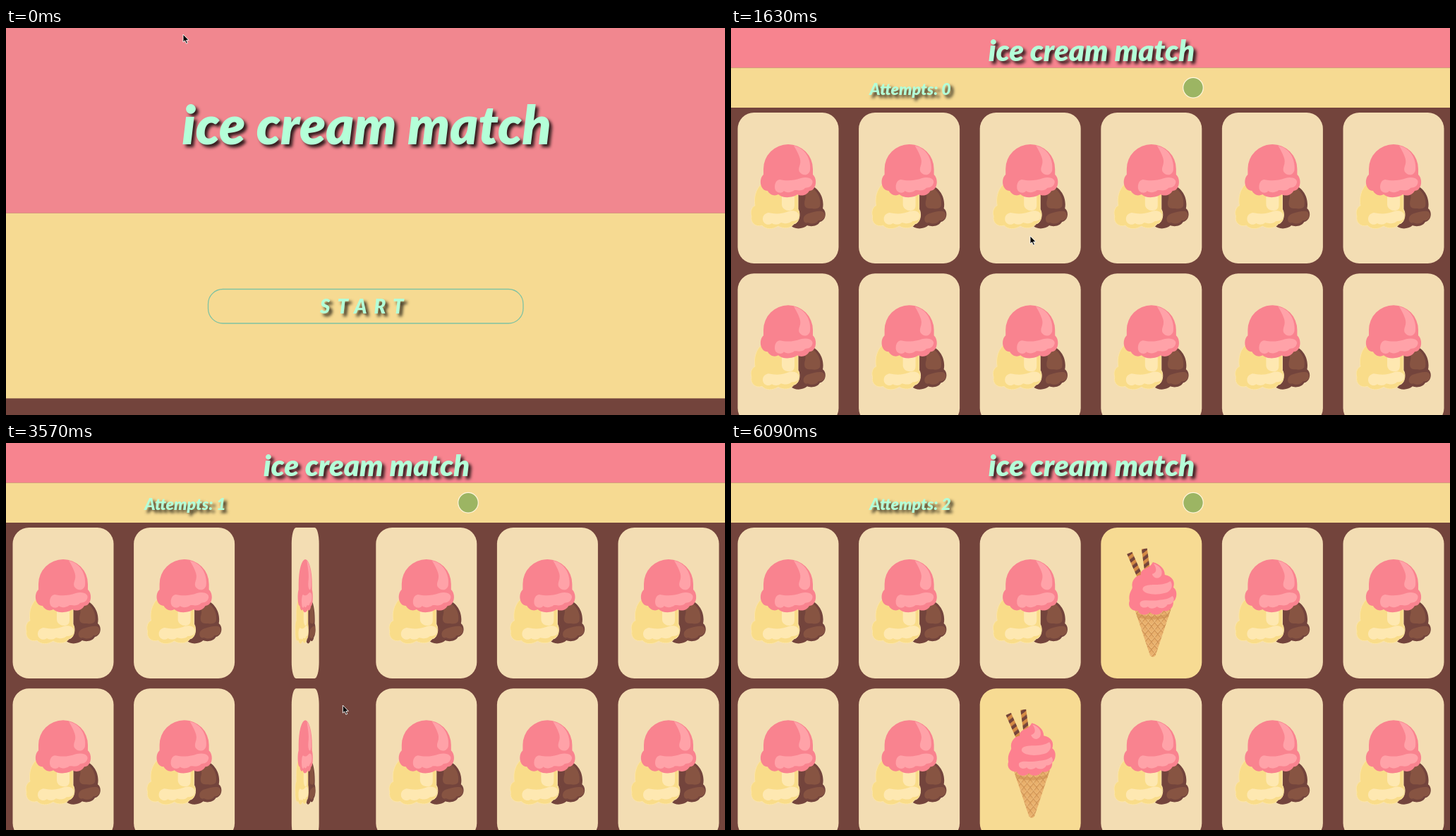
These frames come from a looping animation (1019x549 px, 6.67 s). An HTML page:

```html
<!DOCTYPE html>
<html lang="en">
<head>
<meta charset="utf-8">
<title>ice cream match</title>
<style>
  html, body { margin: 0; width: 100%; height: 100%; overflow: hidden; background: #73443c; }
  svg { display: block; width: 100%; height: 100%; }
  text { font: italic 900 75px Lato, sans-serif; fill: #b4ffd8; filter: drop-shadow(4px 4px 2px #000c); }
  #title, #attempts { text-anchor: middle; }
  #start text { font-size: 27.5px; letter-spacing: 10px; }
</style>
</head>
<body>
<svg id="stage" viewBox="0 0 1019 549">
  <defs>
    <pattern id="waffle" width="9" height="11" patternUnits="userSpaceOnUse">
      <path fill="#e9b06c" d="M0 0H9V11H0Z"/>
      <path fill="none" stroke="#cf9253" stroke-width="1.3" d="M0 0L9 11M9 0L0 11"/>
      <path fill="none" stroke="#f5cb8c" stroke-width=".7" d="M1.3 0L9 9.4M7.7 0L0 9.4"/>
    </pattern>
    <pattern id="stripes" width="9" height="9" patternUnits="userSpaceOnUse" patternTransform="rotate(-38)">
      <path fill="#74443a" d="M0 0H9V9H0Z"/>
      <path fill="#d48b45" d="M0 0H9V4.5H0Z"/>
    </pattern>

    <g id="scoops">
      <path fill="#73443c" d="M0-5H28C43-2 52 14 49 29C55 33 54 46 45 48C41 55 31 55 27 53C20 59 8 59 2 52Z"/>
      <path fill="#875442" d="M22-1H32C43 5 47 16 45 26C42 31 34 29 30 29C23 29 22 23 24 16C26 9 22 6 22-1Z
        M29 36C36 34 42 32 48 33C55 36 52 47 43 46C39 52 31 51 28 49C21 52 18 39 29 36Z"/>
      <path fill="#f9dc89" stroke="#fde6a8" d="M-47 25C-50 8-41-8-30-9H14V30C18 36 16 50 8 51C4 58-8 58-14 54C-22 59-32 59-37 53C-46 56-54 49-52 40C-54 34-52 27-47 25Z"/>
      <path fill="#fee8b1" d="M-9 12C-4 8 6 8 9 11V24C9 31 5 32 1 32C-5 32-9 28-9 23Z
        M-28 35C-19 37-10 37-2 34C6 30 16 33 15 40C15 46 10 47 5 47C0 52-7 50-10 49C-15 53-20 52-23 50C-28 54-36 51-36 44C-36 39-33 36-28 35Z"/>
      <path fill="#f9838f" d="M-35-19V-27A35 35 0 0 1 35-27V-19C42-13 40 4 30 4C26 11 18 12 13 9C7 14-8 15-14 9C-19 12-26 10-29 4C-40 4-42-13-35-19Z"/>
      <path fill="#ffa2a8" d="M8-60C24-57 33-41 31-25C29-17 20-17 16-23C13-30 20-33 16-44C14-50 11-55 8-60Z
        M-12-12C-3-10 7-10 18-14C29-17 37-12 34-6C32 0 26-1 24 0C20 5 13 3 9 3C4 7-3 7-6 4C-9 9-19 7-19-1C-19-7-17-11-12-12Z"/>
    </g>

    <g id="sundae">
      <path fill="url(#waffle)" d="M-31 13H32L28 35C25 38 22 37 22 39L18 63C16 67-16 67-18 63L-22 39C-23 37-26 38-28 35Z"/>
      <path fill="#c98b4e" opacity=".45" d="M-24 36Q0 43 25 36L23 42Q0 47-22 41Z"/>
      <path fill="#fae09a" d="M-31-16C-36 2-35 16-28 18C-24 24-16 24-13 21C-8 27 0 26 3 22C8 26 16 25 18 20C25 23 34 19 32 9C35 0 33-11 30-16Z"/>
      <path fill="#feebbb" d="M-6-9H29Q34 0 30 6C26 11 20 6 16 10C9 16 0 8-6 13C-13 17-23 16-23 10C-23 4-13 5-8 2Z"/>
      <path fill="#73443c" d="M-18-31C-20-44-9-45-5-48H7C10-43 19-43 18-31C25-30 30-27 31-22C36-17 30-10 27-17C24-21 24-8 20-12C18-16 17-9 17 3C17 10 10 10 10 3C10-8 9-19 3-17C-2-15-5-18-6-10V4C-6 11-13 11-13 4V-9C-13-15-18-17-20-10C-22-3-27-4-26-10C-26-19-28-13-32-14C-36-18-28-20-30-23C-28-29-24-30-18-31Z"/>
      <path fill="none" stroke="#73443c" stroke-width="1.4" d="M0-59Q0-63 4-66"/>
      <circle cy="-50" r="10" fill="#e65a4d"/>
      <path fill="#f08272" d="M2-57Q8-54 7-48Q4-50 2-57Z"/>
    </g>

    <g id="cone">
      <path fill="none" stroke="url(#stripes)" stroke-width="8" d="M-31-71L-16-37M-10-77L-6-48"/>
      <path fill="url(#waffle)" d="M-24 8H28L6 74Q2 79-2 74Z"/>
      <path fill="#c98b4e" opacity=".5" d="M-22 14Q2 24 26 14L24 20Q2 27-20 20Z"/>
      <path fill="#fd808f" d="M2-58C13-55 19-48 19-40C30-38 34-30 31-22C38-18 36-5 31-2C32 8 23 13 17 11C11 18 2 18-2 13C-8 19-17 17-19 11C-28 12-34 5-31-3C-33-14-27-19-27-22C-29-32-22-39-15-40C-16-50-2-48 2-58Z"/>
      <path fill="#ffa3a9" d="M3-56C12-53 17-46 14-39C10-33 3-35 1-41C8-43 8-49 3-56Z
        M27-31C32-24 27-15 18-14C7-11-8-12-12-18C-14-25-4-26 5-26C14-26 21-27 27-31Z
        M30-10C35-4 29 3 23 2C19 9 12 8 8 5C3 9-3 8-5 5C-11 9-18 5-16-1C-12-6 0-2 10-4C18-5 25-6 30-10Z"/>
    </g>
  </defs>

  <rect id="header" width="1019"/>
  <rect id="panel" width="1019" fill="#f6da92"/>
  <text id="title">ice cream match</text>
  <g id="start">
    <rect x="286.5" y="370.5" width="446.5" height="48.5" rx="21" fill="none" stroke="#7fc2a2" stroke-width="1.3"/>
    <text x="445" y="405">START</text>
  </g>
  <g id="game">
    <text id="attempts"></text>
    <circle id="badge" cx="655" r="14.3" fill="#9cb563" stroke="#fff6dc" stroke-width="1.2"/>
    <g id="cards"></g>
  </g>
  <path id="cursor" stroke="#fff" stroke-width=".9" d="M0 0V11L2.5 8.8 4.5 13.2 6.4 12.3 4.5 8.3H8Z"/>
</svg>
<script>
const LOOP = 6670, GAME_START = 1030, MOVE = 500, COLUMNS = 6;
const $ = id => document.getElementById(id);

// The picture is held between evenly spaced updates: [first, last, count].
const runs = [[0, 0, 1], [150, 1040, 7], [1220, 1220, 1], [1450, 1450, 1], [1630, 2230, 5],
  [2380, 3420, 8], [3570, 3870, 3], [4160, 4760, 5], [5210, 6090, 7]];
const ticks = runs.flatMap(([first, last, count]) =>
  Array.from({ length: count }, (_, i) => first + (last - first) * i / Math.max(1, count - 1)));

const flips = [
  { card: 2, up: 1850, down: 3400 },
  { card: 8, up: 2420, down: 3400 },
  { card: 3, up: 4065, down: Infinity },
  { card: 8, up: 5050, down: Infinity }
];
const cursorPath = [[0, 251, 9], [150, 256, 20], [750, 510, 398], [1040, 511, 402], [1220, 513, 433],
  [1630, 424, 295], [1930, 424, 295], [2380, 419, 426], [3420, 419, 426], [3870, 594, 264],
  [4160, 594, 264], [4760, 459, 372], [5360, 459, 372], [5950, 882, 536], [6090, 900, 570], [LOOP, 900, 570]];

const mix = (a, b, k) => a + (b - a) * k;
const set = (node, attributes) => {
  for (const name in attributes) node.setAttribute(name, attributes[name]);
};

// cubic-bezier(.25, .1, .25, 1)
function ease(x) {
  if (x <= 0) return 0;
  if (x >= 1) return 1;
  let low = 0, high = 1, u;
  for (let i = 0; i < 20; i++) {
    u = (low + high) / 2;
    const bx = .75 * u * (1 - u) + u ** 3;
    if (bx < x) low = u; else high = u;
  }
  return .3 * u * (1 - u) ** 2 + 3 * u * u * (1 - u) + u ** 3;
}
const progress = (t, start) => ease((t - start) / MOVE);

const cards = Array.from({ length: 2 * COLUMNS }, (_, i) => {
  const node = document.createElementNS('http://www.w3.org/2000/svg', 'g');
  node.innerHTML = '<rect x="-71.5" y="-107" width="143" height="214" rx="23"/><use/>';
  $('cards').append(node);
  return { node, x: 81 + 171.6 * (i % COLUMNS), row: Math.floor(i / COLUMNS), face: i === 2 ? '#sundae' : '#cone' };
});

function drawCard({ node, x, row, face }, index, t, top) {
  const own = flips.filter(flip => flip.card === index);
  const turn = own.reduce((sum, { up, down }) => sum + progress(t, up) - progress(t, down), 0);
  const pressed = own.some(({ up }) => t > up - 200 && t < up + MOVE);
  const front = turn > .5;
  set(node, { transform: `translate(${x} ${top + 114 + 228.3 * row}) scale(${Math.abs(Math.cos(Math.PI * turn))} 1)` });
  set(node.firstChild, { fill: front ? '#f7db93' : '#f3ddb3' });
  set(node.lastChild, {
    href: front ? face : '#scoops',
    transform: `scale(${pressed && !front ? 1.2 : 1})`
  });
}

function drawCursor(t) {
  const next = cursorPath.findIndex(point => point[0] > t);
  const [t0, x0, y0] = cursorPath[next - 1], [t1, x1, y1] = cursorPath[next];
  const k = (t - t0) / (t1 - t0);
  set($('cursor'), { transform: `translate(${mix(x0, x1, k)} ${mix(y0, y1, k)})` });
}

function draw(t) {
  const p = progress(t, GAME_START), playing = t >= GAME_START;
  const height = mix(262.7, 56.5, p), titleSize = mix(75.5, 42.2, p), scoreSize = mix(80, 23.2, p);

  set($('header'), { height, fill: `rgb(${mix(241, 247, p)}, ${mix(135, 132, p)}, 143)` });
  set($('panel'), { y: height, height });
  set($('title'), { x: 511, y: height / 2 + .444 * titleSize, style: `font-size:${titleSize}px` });
  set($('start'), { display: playing ? 'none' : 'inline' });
  set($('game'), { display: playing ? 'inline' : 'none' });
  set($('attempts'), { x: 254, y: 1.5 * height + .43 * scoreSize, style: `font-size:${scoreSize}px` });
  $('attempts').textContent = 'Attempts: ' + (t < 3400 ? 0 : t < 6050 ? 1 : 2);
  set($('badge'), { cy: 1.5 * height });
  cards.forEach((card, i) => drawCard(card, i, t, 2 * height));
  drawCursor(t);
}

let begin;
function frame(now) {
  begin ??= now;
  const t = (now - begin) % LOOP;
  draw(ticks.findLast(tick => tick <= t));
  requestAnimationFrame(frame);
}
draw(0);
requestAnimationFrame(frame);
</script>
</body>
</html>
```
